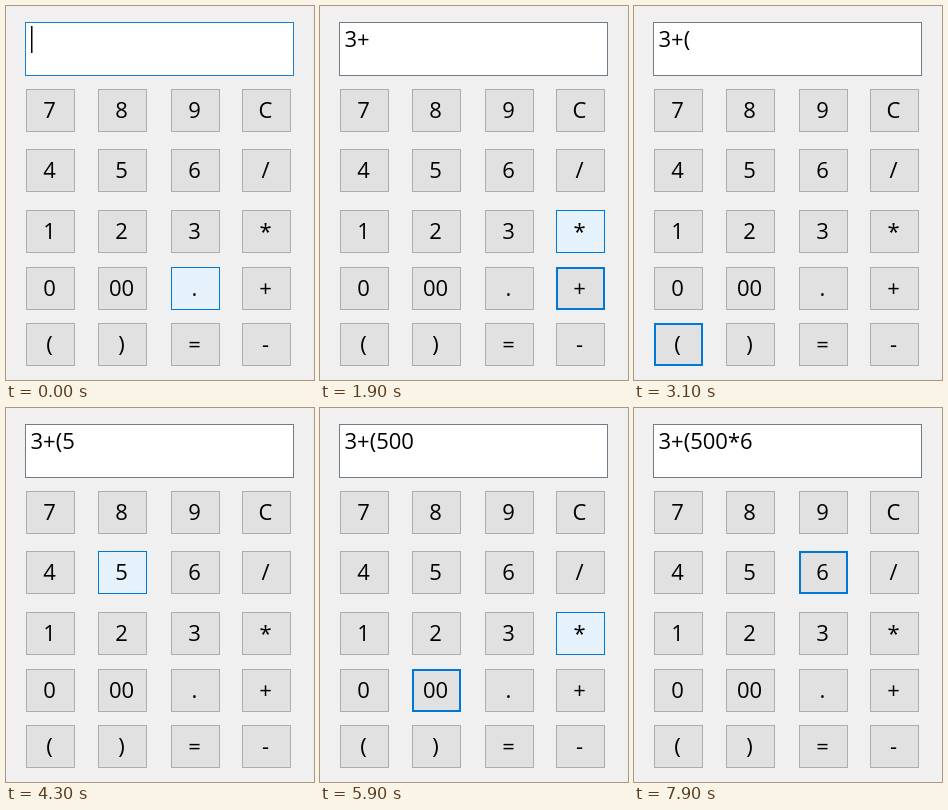
These frames come from a looping animation (308x374 px, 8000 ms). An HTML page with a canvas:

```html
<!DOCTYPE html>
<html lang="en">
<head>
<meta charset="utf-8">
<title>Calculator</title>
<style>
  html, body { margin: 0; width: 100%; height: 100%; overflow: hidden; background: #f0f0f0; }
  canvas { display: block; width: 308px; height: 374px; }
</style>
</head>
<body>
<canvas id="stage"></canvas>
<script>
const W = 308, H = 374, LOOP = 8000, STEP = 100, FADE = 200;
const canvas = document.getElementById('stage');
const ctx = canvas.getContext('2d');
const dpr = window.devicePixelRatio || 1;
canvas.width = W * dpr;
canvas.height = H * dpr;
ctx.scale(dpr, dpr);

const FONT = '22px "Open Sans", "Noto Sans", sans-serif';
const GRAY = [173, 173, 173], BLUE = [0, 120, 215];
const FACE = [225, 225, 225], HOT = [229, 241, 251], DOWN = [204, 228, 247];

const cols = [20, 92, 165, 236];
const rows = [83, 143, 204, 261, 317];
const labels = ['7 8 9 C', '4 5 6 /', '1 2 3 *', '0 00 . +', '( ) = -'];
const keys = labels.flatMap((line, r) =>
  line.split(' ').map((label, c) => ({ label, x: cols[c], y: rows[r] })));

// key, press time, release time (the text appears on release)
const clicks = [
  ['3', 700, 800], ['+', 1400, 1600], ['(', 2600, 2800], ['5', 3800, 4000],
  ['00', 5000, 5200], ['*', 6100, 6200], ['6', 6900, 7100]
];

// key, pointer enters, pointer leaves
const hovers = [
  ['.', -1000, 100], ['3', 100, 1100], ['+', 1200, 1700], ['*', 1700, 2100],
  ['(', 2400, 2900], ['2', 3200, 3400], ['5', 3400, 4400], ['2', 4400, 4600],
  ['00', 4600, 5500], ['.', 5500, 5600], ['*', 5600, 6300], ['6', 6400, 7300],
  ['3', 7300, 7400], ['.', 7400, 7500], ['=', 7500, 7700]
];

const clamp = v => Math.min(1, Math.max(0, v));
const mix = (a, b, k) => `rgb(${a.map((v, i) => Math.round(v + (b[i] - v) * k))})`;

function hoverLevel(label, t) {
  let level = 0;
  for (const [key, start, end] of hovers) {
    if (key !== label) continue;
    const peak = clamp((Math.min(t, end) - start) / FADE);
    level = Math.max(level, peak - clamp((t - end) / FADE));
  }
  return level;
}

function frame(x, y, w, h, line, fill, stroke) {
  ctx.fillStyle = fill;
  ctx.fillRect(x, y, w, h);
  ctx.lineWidth = line;
  ctx.strokeStyle = stroke;
  ctx.strokeRect(x + line / 2, y + line / 2, w - line, h - line);
}

function drawKey({ label, x, y }, t, last) {
  const hot = hoverLevel(label, t);
  const focused = last && last[0] === label;
  const pressed = focused && t < last[2];
  const fill = pressed ? mix(DOWN, DOWN, 0) : mix(FACE, HOT, hot);
  const edge = mix(focused ? BLUE : GRAY, BLUE, hot);
  frame(x, y, 49, 43, focused ? 2 - hot : 1, fill, pressed ? '#005499' : edge);
  ctx.fillStyle = '#000';
  ctx.textAlign = 'center';
  ctx.fillText(label, x + 23.5, y + 29);
}

function drawDisplay(t, last) {
  frame(19, 16, 269, 54, 1, '#fff', last ? '#707c88' : '#1c80c8');
  ctx.fillStyle = '#000';
  if (!last) ctx.fillRect(25, 20, 1.5, 27);
  const text = clicks.filter(c => t >= c[2]).map(c => c[0]).join('');
  ctx.textAlign = 'left';
  ctx.fillText(text, 24.5, 41);
}

function draw(now) {
  const t = Math.floor((now % LOOP) / STEP) * STEP;
  const last = clicks.filter(c => t >= c[1]).pop();
  ctx.fillStyle = '#f0f0f0';
  ctx.fillRect(0, 0, W, H);
  ctx.font = FONT;
  drawDisplay(t, last);
  keys.forEach(key => drawKey(key, t, last));
  requestAnimationFrame(draw);
}
requestAnimationFrame(draw);
</script>
</body>
</html>
```
